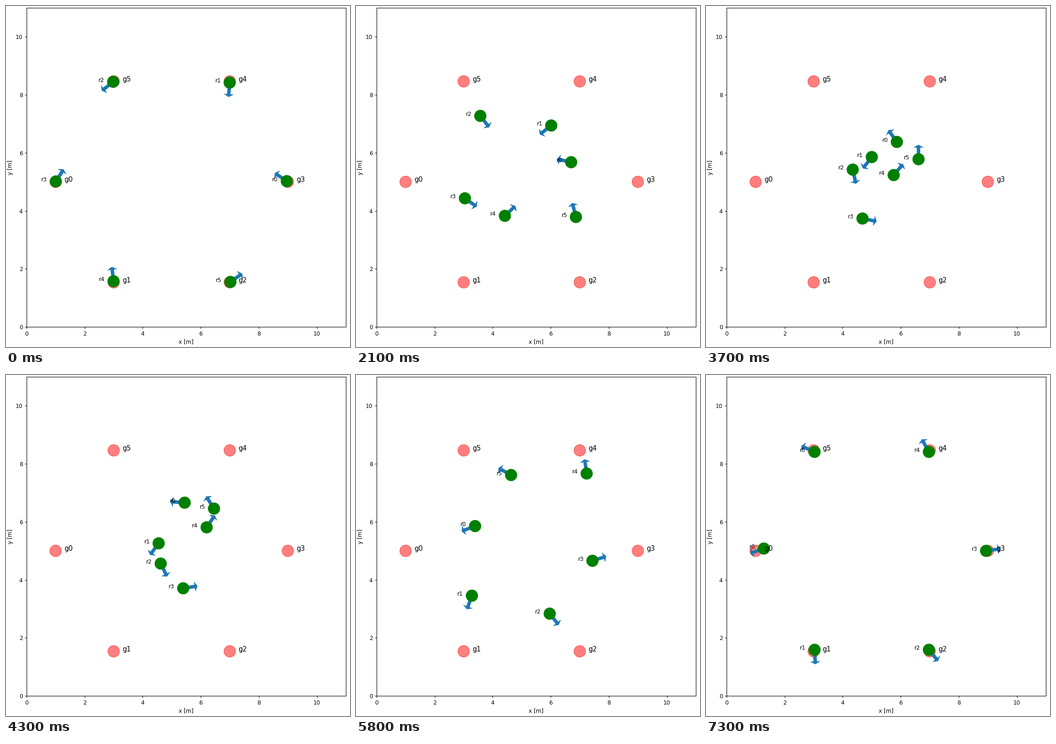
Write a matplotlib script that moves like this. It is 751 px wide and 745 px high and loops after 8000 ms.

```python
import numpy as np
import matplotlib.pyplot as plt
from matplotlib.animation import FuncAnimation
from matplotlib.patches import Circle, Polygon

W, H, DPI = 751, 745, 100
K = 0.875              # text and tick scale
FRAMES, STEP = 80, 0.1
T_END = 7.3            # everything rests after this
VMAX = 1.5             # m/s
MID, RING = 5 + 5j, 4  # robots start on a ring and cross to the far side
STOP = 0.06            # how far short of the goal they halt

plt.rcParams.update({
    "font.family": "DejaVu Sans", "font.size": 10 * K,
    "xtick.major.size": 3.5 * K, "ytick.major.size": 3.5 * K,
    "xtick.major.pad": 3.5 * K, "ytick.major.pad": 3.5 * K,
    "axes.labelpad": 4 * K,
})

# per robot: first heading off the inward line, then (radius, swing) on the way
KEY_TIMES = [-0.03, 1.0, 3.0, 4.3, 5.8]
ROUTES = [
    (-36, (2.59, 10.5), (1.52, 36), (1.72, 75), (1.82, 152)),
    (27, (2.97, -1.7), (1.53, 11.5), (0.52, 90), (2.31, 162)),
    (-84, (3.59, 3), (1.66, 3), (0.58, 109), (2.37, 174)),
    (70, (2.97, 0.4), (1.51, 44), (1.35, 107), (2.46, 172)),
    (40, (2.67, -3.5), (0.44, 59), (1.45, 154), (3.48, 170)),
    (-90, (3.27, 10), (1.62, 57), (2.06, 105), (2.64, 158)),
]

ARROW = np.array([0 + .06j, 0 - .06j, .4 - .06j, .4 - .18j,
                  .5, .4 + .18j, .4 + .06j])


def polar(r, deg):
    return r * np.exp(1j * np.radians(deg))


class Route:
    """Cubic path in the complex plane; the robot faces along its velocity."""

    def __init__(self, n, turn, *via):
        base = 60 * n
        stops = [(RING, 0), *via, (RING - STOP, 180)]
        self.p = np.array([MID + polar(r, base + a) for r, a in stops])
        step = np.diff(self.p)
        # the last leg is driven at full speed
        self.t = np.array(KEY_TIMES + [KEY_TIMES[-1] + abs(step[-1]) / VMAX])
        h = np.diff(self.t)
        d = step / h
        inner = (d[:-1] * h[1:] + d[1:] * h[:-1]) / (h[:-1] + h[1:])
        # slow while still facing away from the first leg
        face = polar(1, base + 180 + turn)
        aim = (face * np.conj(d[0])).real / abs(d[0])
        first = VMAX * max(aim, 0.1) * face
        self.v = np.array([first, *inner, 2 * d[-1] - inner[-1]])

    def pose(self, t):
        t = min(t, T_END, self.t[-1])
        i = min(np.searchsorted(self.t, t, side="right") - 1, len(self.t) - 2)
        h = self.t[i + 1] - self.t[i]
        u = (t - self.t[i]) / h
        p, step = self.p[i], self.p[i + 1] - self.p[i]
        a, b = h * self.v[i], h * self.v[i + 1]
        c2, c3 = 3 * step - 2 * a - b, a + b - 2 * step
        pos = p + u * (a + u * (c2 + u * c3))
        vel = a + u * (2 * c2 + 3 * u * c3)
        return pos, vel / abs(vel)


fig = plt.figure(figsize=(W / DPI, H / DPI), dpi=DPI, facecolor="white")
ax = fig.add_axes([45 / W, 44 / H, 697 / W, 697 / H])
ax.set(xlim=(0, 11), ylim=(0, 11), xlabel="x [m]", ylabel="y [m]",
       xticks=range(0, 11, 2), yticks=range(0, 11, 2))

robots = []
for n, route in enumerate(ROUTES):
    goal = MID + polar(RING, 180 + 60 * n)
    ax.add_patch(Circle((goal.real, goal.imag), 0.2, color="r", alpha=0.5,
                        lw=K, zorder=1))
    ax.text(goal.real + 0.3, goal.imag, f"g{n}", fontsize=12 * K, zorder=4)

    arrow = ax.add_patch(Polygon([(0, 0)] * 3, fc="C0", lw=0, zorder=2))
    body = ax.add_patch(Circle((0, 0), 0.2, color="g", lw=K, zorder=3))
    label = ax.text(0, 0, f"r{n}", fontsize=10 * K, zorder=4)
    robots.append((Route(n, *route), arrow, body, label))


def update(frame):
    for route, arrow, body, label in robots:
        pos, face = route.pose(frame * STEP)
        tips = pos + ARROW * face
        arrow.set_xy(np.c_[tips.real, tips.imag])
        body.center = (pos.real, pos.imag)
        label.set_position((pos.real - 0.5, pos.imag))
    return [artist for robot in robots for artist in robot[1:]]


anim = FuncAnimation(fig, update, frames=FRAMES, init_func=lambda: update(0),
                     interval=1000 * STEP, repeat=True, repeat_delay=0)
plt.show()
```
